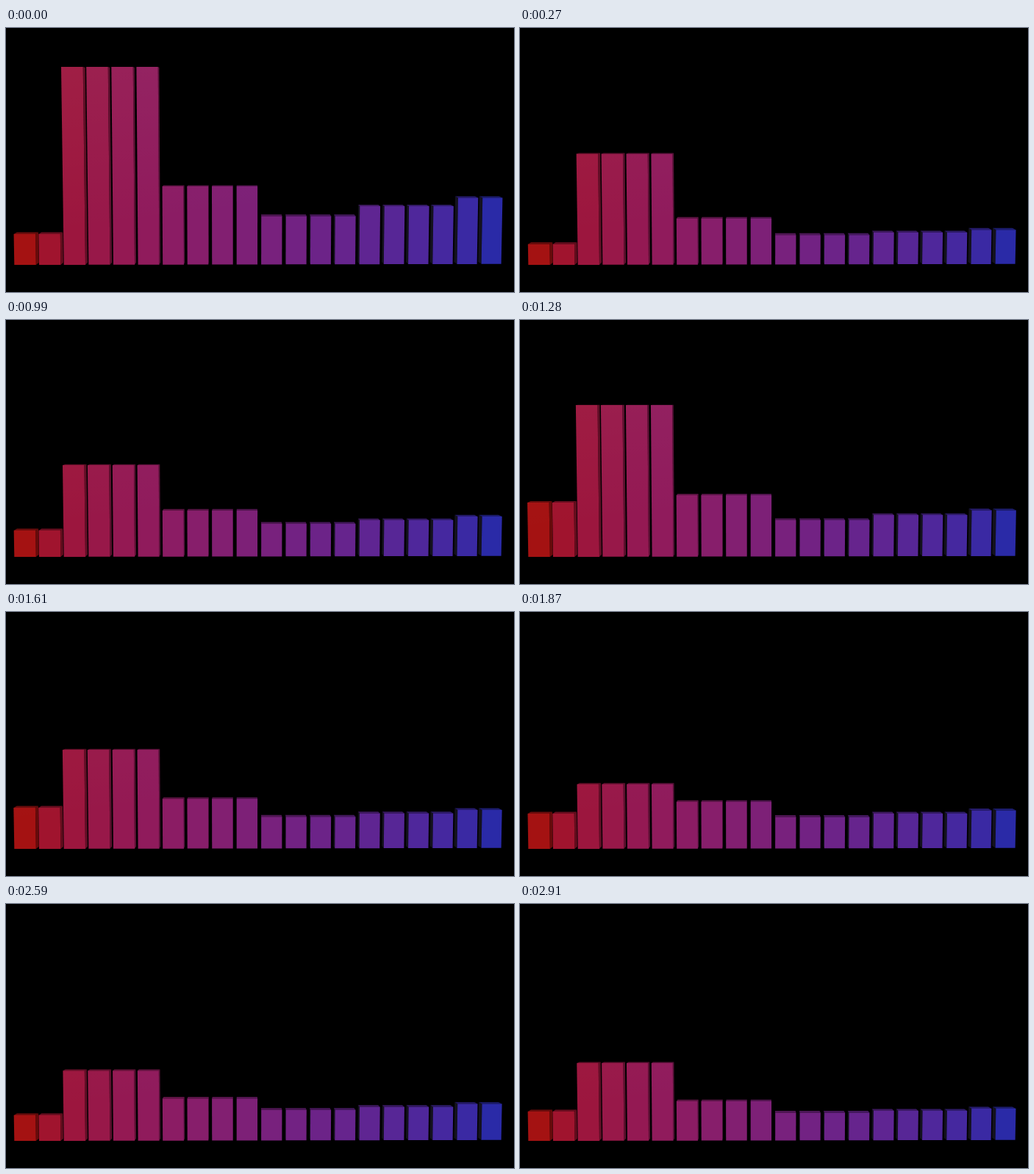
An HTML page with a canvas for the animation above (2960 ms loop, 691x360 px).

```html
<!DOCTYPE html>
<html>
<head>
<meta charset="utf-8">
<style>
  html, body { margin: 0; width: 100%; height: 100%; overflow: hidden; background: #000; }
  canvas { display: block; }
</style>
</head>
<body>
<canvas id="stage" width="691" height="360"></canvas>
<script>
const ctx = document.getElementById('stage').getContext('2d');
const LOOP = 2960, BEAT = LOOP / 16 * 3, BARS = 20;
const BASE = 323, DEPTH = 0.0137, SPREAD = 0.000056;
const EYE = { x: 325, y: 100 };
const RED = [164, 18, 18], BLUE = [42, 42, 167];

// Time in ms, then the heights of sub, bass, mid and treble
const poses = [
  [0, 42, 270, 107, 80],
  [590, 46, 191, 86, 54],
  [990, 36, 125, 63, 50],
  [1280, 74, 207, 84, 57],
  [1870, 48, 88, 64, 48],
  [2300, 33, 93, 64, 53],
  [2910, 40, 106, 54, 41]
];
poses.push([LOOP, ...poses[0].slice(1)]);

const mix = (a, b, u) => a + (b - a) * u;

// Each beat hits hard, the off-beat softer, and both die away
function pulse(t) {
  const phase = t % BEAT, half = BEAT / 2;
  const hit = phase < half ? 1 : 0.7;
  return 0.5 + 0.5 * hit * Math.exp(-(phase % half) / 170);
}

// The picture advances in steps of about 50 ms
function levels(t) {
  const k = poses.findIndex(p => p[0] > t);
  const [from, ...a] = poses[k - 1], [to, ...b] = poses[k];
  const steps = Math.round((to - from) / 50);
  const u = Math.floor((t - from) / (to - from) * steps) / steps;
  const now = pulse(mix(from, to, u));
  return a.map((h, i) => mix(h / pulse(from), b[i] / pulse(to), u) * now);
}

function groupHeights(t) {
  const [sub, bass, mid, treble] = levels(t);
  return [sub, bass, mid, 9 + 0.72 * treble, treble, 1.22 * treble - 6];
}

const blend = u => RED.map((c, i) => mix(c ** 2.2, BLUE[i] ** 2.2, u) ** (1 / 2.2));
const shade = (color, k) => `rgb(${color.map(c => Math.round(c * k))})`;
const back = ([x, y]) => [mix(x, EYE.x, DEPTH), mix(y, EYE.y, DEPTH)];

function fill(style, ...points) {
  ctx.fillStyle = style;
  ctx.beginPath();
  points.forEach(p => ctx.lineTo(...p));
  ctx.fill();
}

const sheen = ctx.createLinearGradient(0, 50, 30, 290);
sheen.addColorStop(0, 'rgba(255,255,255,0.04)');
sheen.addColorStop(1, 'rgba(255,255,255,0)');

function drawBar(i, height) {
  const color = blend(i / (BARS - 1));
  const left = 11.3 + 33.75 * i - 0.0165 * i * i;
  const right = left + 29.5 - 0.13 * i;
  const bottom = BASE - i * 0.06, top = BASE - height;
  // Bars spread slightly outwards as they rise
  const lean = x => x + (x - EYE.x) * height * SPREAD;
  const tl = [lean(left), top], tr = [lean(right), top];
  const bl = [left, bottom], br = [right, bottom];

  if (right < EYE.x) fill(shade(color, 0.62), tr, back(tr), back(br), br);
  if (left > EYE.x) fill('rgb(20,18,30)', tl, back(tl), back(bl), bl);
  if (top > EYE.y) fill(shade(color, 0.66), tl, back(tl), back(tr), tr);
  fill(shade(color, 1), tl, tr, br, bl);
  fill(sheen, tl, tr, br, bl);
}

function draw(t) {
  const heights = groupHeights(t);
  ctx.clearRect(0, 0, 691, 360);
  for (let i = 0; i < BARS; i++) drawBar(i, heights[Math.floor((i + 2) / 4)]);
}

const start = performance.now();
function tick() {
  draw((performance.now() - start) % LOOP);
  requestAnimationFrame(tick);
}
tick();
</script>
</body>
</html>
```
